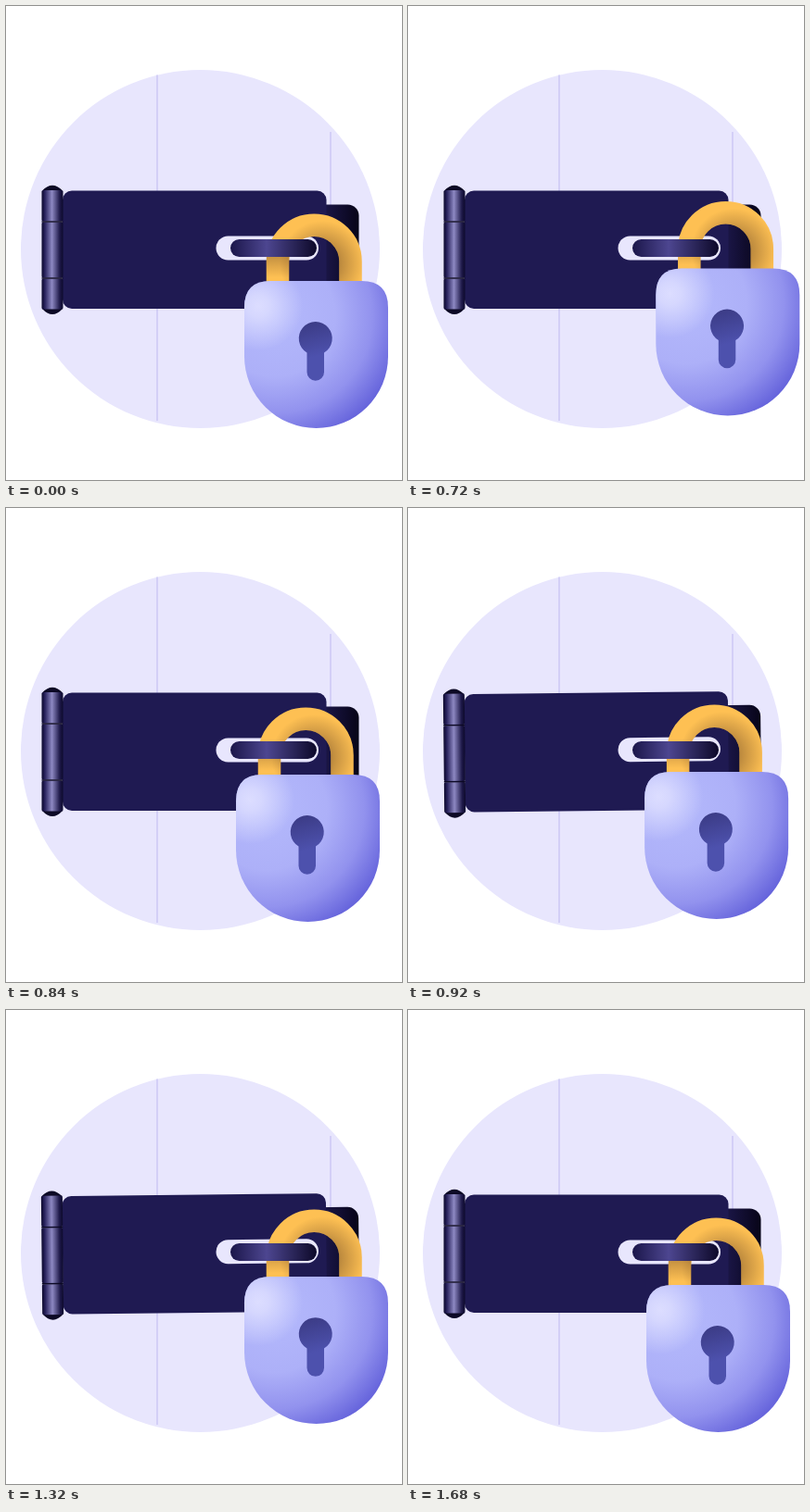
Animation of 427 by 512 pixels, one loop 1.72 s. Source, as an HTML page:

```html
<!DOCTYPE html>
<html lang="en">
<head>
<meta charset="utf-8">
<title>Padlock</title>
<style>
  html, body { margin: 0; width: 100%; height: 100%; overflow: hidden; background: #fff; }
  svg { display: block; width: 427px; height: 512px; }
</style>
</head>
<body>
<svg viewBox="0 0 427 512">
  <defs>
    <linearGradient id="metal">
      <stop offset="0" stop-color="#0d0a2c"/>
      <stop offset=".14" stop-color="#26205a"/>
      <stop offset=".48" stop-color="#8d88c2"/>
      <stop offset=".85" stop-color="#1d1848"/>
      <stop offset="1" stop-color="#0d0a2c"/>
    </linearGradient>
    <linearGradient id="back" gradientUnits="userSpaceOnUse" x1="335" y1="0" x2="381" y2="0">
      <stop offset="0" stop-color="#1f1a52"/>
      <stop offset="1" stop-color="#070417"/>
    </linearGradient>
    <linearGradient id="pin">
      <stop offset="0" stop-color="#1b164a"/>
      <stop offset=".42" stop-color="#4d4690"/>
      <stop offset="1" stop-color="#0d0929"/>
    </linearGradient>
    <radialGradient id="skin" gradientUnits="userSpaceOnUse" cx="290" cy="335" r="142">
      <stop offset="0" stop-color="#b4b9fc"/>
      <stop offset=".46" stop-color="#adb0f8"/>
      <stop offset=".74" stop-color="#9292ee"/>
      <stop offset="1" stop-color="#6260da"/>
    </radialGradient>
    <radialGradient id="shine" gradientUnits="userSpaceOnUse" cx="272" cy="324" r="48">
      <stop offset="0" stop-color="#dcddff"/>
      <stop offset=".25" stop-color="#dcddff" stop-opacity=".85"/>
      <stop offset="1" stop-color="#dcddff" stop-opacity="0"/>
    </radialGradient>
    <linearGradient id="hole" gradientUnits="userSpaceOnUse" x1="326" y1="341" x2="336" y2="378">
      <stop offset="0" stop-color="#3b3b85"/>
      <stop offset="1" stop-color="#4d51ad"/>
    </linearGradient>
    <radialGradient id="archShade" gradientUnits="userSpaceOnUse" cx="341" cy="278" r="46">
      <stop offset=".4" stop-color="#5e3c20" stop-opacity=".42"/>
      <stop offset="1" stop-color="#5e3c20" stop-opacity="0"/>
    </radialGradient>
    <linearGradient id="legShade" x2="0" y2="1">
      <stop offset="0" stop-color="#5e3c20" stop-opacity=".35"/>
      <stop offset="1" stop-color="#5e3c20" stop-opacity="0"/>
    </linearGradient>
    <path id="arch" d="M293 300V276A39 39 0 0 1 371.5 276V300" fill="none" stroke-width="24.5"/>
    <path id="body" d="M285 297H383.5Q412 297 412 325.5V378.5A77.5 77.5 0 0 1 257 378.5V325.5Q257 297 285 297Z"/>
  </defs>

  <circle cx="209.5" cy="262.5" r="193.5" fill="#e8e6fd"/>
  <path d="M163 74.500V448M350 136V390" stroke="#d3cff7" stroke-width="2"/>

  <g id="hasp">
    <rect x="300" y="214.500" width="80.500" height="97" rx="12" fill="url(#back)"/>
    <rect x="61" y="199.500" width="284.500" height="127.500" rx="10" fill="#1f1a52"/>
    <path d="M39 199.500Q50 188 61 199.500ZM39 327Q50 339 61 327Z" fill="#0c0925"/>
    <g fill="url(#metal)">
      <rect x="38.500" y="199" width="23" height="33.500" rx="1.500"/>
      <rect x="38.500" y="233.500" width="23" height="60" rx="1.500"/>
      <rect x="38.500" y="294.500" width="23" height="33" rx="1.500"/>
    </g>
    <path d="M38.500 233H61.500M38.500 294H61.500" stroke="#0c0925" stroke-width="1.500"/>
    <rect x="226.500" y="248.500" width="110.500" height="26" rx="13" fill="#e8e6fd"/>
  </g>

  <g class="lock">
    <use href="#arch" stroke="#fec053"/>
    <use href="#arch" stroke="url(#archShade)"/>
    <rect x="280.750" y="271" width="24.500" height="22" fill="url(#legShade)"/>
  </g>
  <rect x="242" y="252" width="93" height="19" rx="9.500" fill="url(#pin)"/>
  <g class="lock">
    <use href="#body" fill="url(#skin)"/>
    <use href="#body" fill="url(#shine)"/>
    <path d="M324.500 374.500A18 18 0 1 1 343 374.500V395.500A9.250 9.250 0 0 1 324.500 395.500Z" fill="url(#hole)"/>
  </g>
</svg>
<script>
  const LOOP = 1720, STEP = 40, SHAKE = 520;

  // time, lock x, lock y, hasp angle
  const poses = [
    [520, 11.5, -15, 0],
    [620, -10.5, -9.5, 0],
    [720, 10.3, -13.5, 0],
    [840, -9, -9, 0],
    [960, 0.5, -13, -0.8],
    [1150, -0.3, 3, 0.2],
    [1330, 0, -9, -0.6],
    [1520, -0.5, 4, 0.2],
    [1620, 0, -0.5, 0],
    [1680, 0, 0, 0]
  ];
  const hasp = document.getElementById('hasp');
  const lockParts = document.querySelectorAll('.lock');

  function poseAt(t) {
    if (t < SHAKE) return [0, 0, 0];
    const next = poses.findIndex(p => p[0] > t);
    if (next < 0) return [0, 0, 0];
    const a = poses[next - 1], b = poses[next];
    const k = (1 - Math.cos(Math.PI * (t - a[0]) / (b[0] - a[0]))) / 2;
    return [1, 2, 3].map(i => a[i] + (b[i] - a[i]) * k);
  }

  const start = performance.now();
  function draw() {
    const t = (performance.now() - start) % LOOP;
    const [x, y, angle] = poseAt(Math.floor(t / STEP) * STEP);
    lockParts.forEach(el => el.setAttribute('transform', `translate(${x} ${y})`));
    hasp.setAttribute('transform', `rotate(${angle} 209 262)`);
    requestAnimationFrame(draw);
  }
  draw();
</script>
</body>
</html>
```
